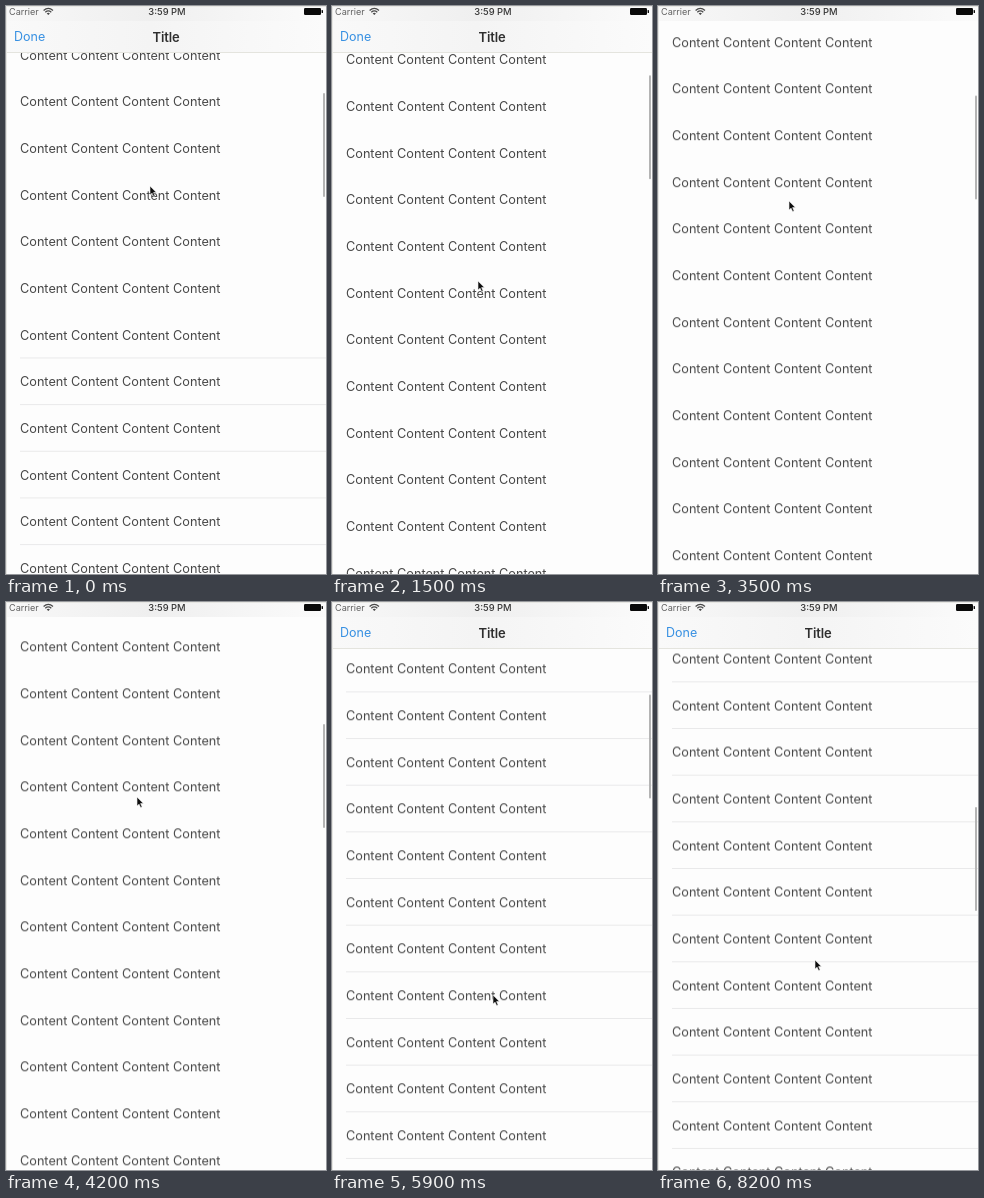
An HTML page that plays this animation: 320x568 px, repeating every 8.3 s.

```html
<!DOCTYPE html>
<html lang="en">
<head>
<meta charset="utf-8">
<title>Scrolling list</title>
<style>
  html, body { margin: 0; width: 100%; height: 100%; overflow: hidden; background: #fdfdfd; }
  #stage {
    position: relative; width: 320px; height: 568px; overflow: hidden;
    background: #fdfdfd; color: #474747;
    font: 12.7px/46.667px Inter, Roboto, sans-serif; white-space: nowrap;
  }
  #stage div, #stage svg { position: absolute; }
  #list { left: 14px; top: 48px; will-change: transform; }
  #list div { left: 0; height: 46.667px; }
  #lines {
    left: 14px; top: 0; width: 306px; height: 568px;
    background: linear-gradient(transparent 45.667px, #e9e9ea 0) 0 0 / 306px 46.667px;
  }
  #bar {
    left: 0; top: 0; width: 320px; height: 47px; box-sizing: border-box;
    border-bottom: 1px solid #e4e4de; line-height: 20px;
    background: linear-gradient(90deg, #f9f9f9, #f4f4f4 45%, #fbfbfb);
  }
  #done { left: 8px; top: 20.6px; font-size: 12.5px; color: #3790e2; }
  #title { left: 0; width: 320px; top: 20.6px; text-align: center; font-size: 13px; font-weight: 600; letter-spacing: -0.15px; color: #2e2e2e; }
  #status {
    left: 0; top: 0; width: 320px; height: 15px; line-height: 11px; font-size: 9.1px;
    background: linear-gradient(90deg, #f8f8f8, #efefef 45%, #fbfbfb);
  }
  #carrier { left: 3px; color: #626262; }
  #clock { left: 1px; width: 320px; text-align: center; font-weight: 500; font-size: 9.4px; color: #363636; }
  #thumb { left: 316.5px; top: 0; width: 2.5px; height: 104px; border-radius: 1.3px; background: #b4b4b4; }
  #edge { left: 0; top: 0; width: 320px; height: 568px; box-sizing: border-box; border: solid #e6e6e2; border-width: 1px 0 0 1px; }
  #cursor { left: 0; top: 0; overflow: visible; }
</style>
</head>
<body>
<div id="stage">
  <div id="lines"></div>
  <div id="list"></div>
  <div id="bar"><div id="done">Done</div><div id="title">Title</div></div>
  <div id="status">
    <div id="carrier">Carrier</div>
    <div id="clock">3:59 PM</div>
    <svg width="320" height="15">
      <g fill="none" stroke="#484848" stroke-width="1.3">
        <path d="M37.6 4.4Q42.3 0.4 47 4.4M39.3 6.2Q42.3 3.7 45.3 6.2"/>
      </g>
      <path d="M40.7 7.4Q42.3 6.2 43.9 7.4L42.3 9Z" fill="#484848"/>
      <rect x="298" y="2" width="17" height="7" rx="1.2" fill="#0a0a0a"/>
      <rect x="315.6" y="4" width="1.4" height="3" rx="0.6" fill="#0a0a0a"/>
    </svg>
  </div>
  <div id="thumb"></div>
  <div id="edge"></div>
  <svg id="cursor" width="10" height="14">
    <path d="M0 0V9L2.1 7.2L3.6 10.6L5.1 9.9L3.6 6.6H6.4Z" fill="#0e0e0e" stroke="#f4f4f4" stroke-width="0.6"/>
  </svg>
</div>
<script>
const LOOP = 8300, STEP = 100, ROW = 140 / 3, NAV = 47, HIDE = 32;

const ease = {
  lin: u => u,
  in: u => u * u,
  out: u => u * (2 - u),
  both: u => u * u * (3 - 2 * u)
};

// time, scroll offset, pointer x, pointer y, easing towards this key
const keys = [
  [0, 207.8, 144, 180, 'lin'],
  [1500, 109.8, 146, 275, 'both'],
  [2000, 75.1, 141, 303, 'out'],
  [2800, 75.1, 141, 303, 'lin'],
  [3400, 183.1, 131, 195, 'in'],
  [4688, 434.6, 131, 195, 'out'],
  [4800, 434.6, 131, 195, 'lin'],
  [5800, 236.6, 161, 393, 'both'],
  [5900, 236.6, 161, 393, 'lin'],
  [6700, 544.6, 155, 85, 'in'],
  [7300, 998.3, 155, 85, 'lin'],
  [7600, 1126.3, 155, 85, 'out'],
  [8200, 853.3, 157, 358, 'both'],
  [LOOP, 853.3, 157, 358, 'lin']
];

// separators vanish while the list moves: time, top of the visible part
const reveal = [[0, 340], [700, 568], [2000, 0], [3400, 568], [4700, 0]];

const $ = id => document.getElementById(id);
const clamp = (v, a, b) => Math.min(b, Math.max(a, v));
const [list, lines, bar, done, title, thumb, cursor] =
  ['list', 'lines', 'bar', 'done', 'title', 'thumb', 'cursor'].map($);

for (let i = 0; i < 40; i++) {
  const row = document.createElement('div');
  row.textContent = 'Content Content Content Content';
  row.style.top = i * ROW + 'px';
  list.append(row);
}

// how far the bar is tucked away at each key
const tucked = [0];
for (let i = 1; i < keys.length; i++)
  tucked.push(clamp(tucked[i - 1] + keys[i][1] - keys[i - 1][1], 0, HIDE));

function draw(t) {
  let i = 1;
  while (t >= keys[i][0]) i++;
  const a = keys[i - 1], b = keys[i];
  const u = ease[b[4]]((t - a[0]) / (b[0] - a[0]));
  const [scroll, x, y] = [1, 2, 3].map(k => a[k] + (b[k] - a[k]) * u);
  const hide = clamp(tucked[i - 1] + scroll - a[1], 0, HIDE);
  const top = reveal.filter(r => r[0] <= t).pop()[1];

  list.style.transform = `translateY(${-scroll}px)`;
  lines.style.backgroundPositionY = (NAV - scroll) % ROW + 'px';
  lines.style.clipPath = `inset(${top}px 0 0 0)`;
  bar.style.transform = `translateY(${-hide}px)`;
  done.style.opacity = title.style.opacity = 1 - hide / HIDE;
  thumb.style.transform = `translateY(${49.2 + scroll * 0.1825}px)`;
  cursor.style.transform = `translate(${x}px, ${y}px)`;
}

const start = performance.now();
function tick() {
  const t = (performance.now() - start) % LOOP;
  draw(Math.floor(t / STEP) * STEP);
  requestAnimationFrame(tick);
}
tick();
</script>
</body>
</html>
```
